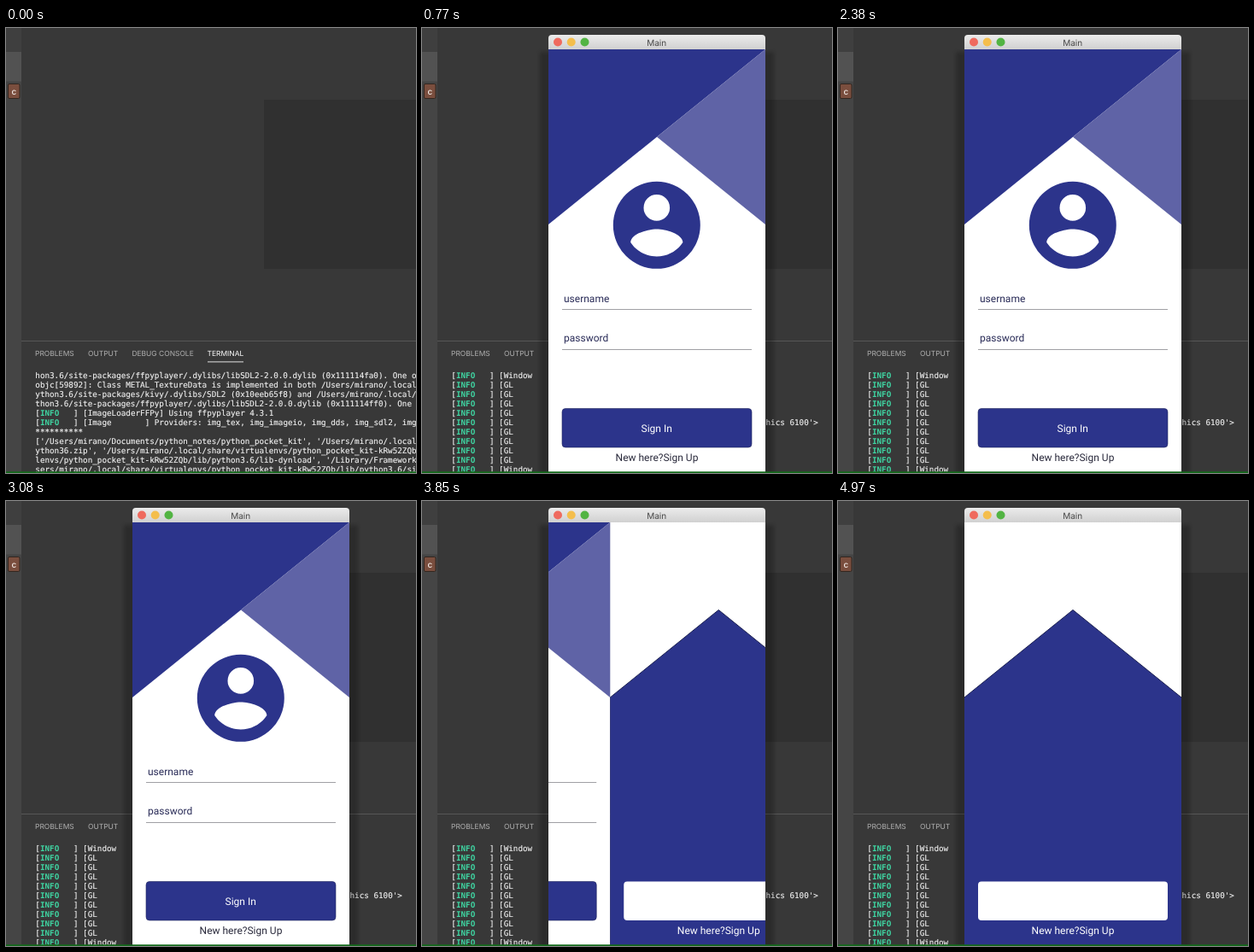
Write an HTML page that moves like this. It is 480 px wide and 521 px high and loops after 5.04 s.

```html
<!DOCTYPE html>
<html lang="en">
<head>
<meta charset="utf-8">
<title>Sign-in screen demo</title>
<style>
  html, body { margin: 0; width: 100%; height: 100%; overflow: hidden; background: #383838; }
  svg { display: block; width: 480px; height: 521px; }
  text { white-space: pre; text-rendering: geometricPrecision; }
  .term { font: 9.27px "DejaVu Sans Mono", monospace; fill: #f0f0f0; }
  .term text { stroke: #f0f0f0; stroke-width: .15px; }
  .info { font-weight: bold; fill: #3fd5a2; stroke: none; }
  .tab { font: 8.45px Inter, sans-serif; fill: #b0b0b0; }
  .app { font: 12px Roboto, sans-serif; }
  .mid { text-anchor: middle; }
</style>
</head>
<body>
<svg viewBox="0 0 480 521">
  <defs>
    <clipPath id="oldClip"><rect id="oldBox" y="398" height="123"/></clipPath>
    <clipPath id="screen"><rect x="148" y="25" width="254" height="496"/></clipPath>
    <linearGradient id="bar" x2="0" y2="1">
      <stop stop-color="#ebebeb"/><stop offset="1" stop-color="#d0d0d0"/>
    </linearGradient>
  </defs>

  <!-- editor -->
  <rect width="480" height="521" fill="#383838"/>
  <rect width="18" height="521" fill="#454545"/>
  <rect width="18" height="28" fill="#3f3f3f"/>
  <rect y="28" width="18" height="34.5" fill="#525252"/>
  <rect x="2.5" y="65.5" width="13.5" height="17" rx="1.5" fill="#7a4e3e" stroke="#33261f"/>
  <text class="mid" x="9.3" y="78" style="font:500 10px Inter,sans-serif" fill="#f4ece8">c</text>
  <rect x="302" y="84" width="198" height="198" fill="#303030"/>

  <!-- panel -->
  <path d="M18 366.5H480" stroke="#575757"/>
  <text class="tab" x="34" y="384">PROBLEMS</text>
  <text class="tab" x="96" y="384">OUTPUT</text>
  <text class="tab" x="147.4" y="384">DEBUG CONSOLE</text>
  <text class="tab" x="235.5" y="384" style="fill:#fff">TERMINAL</text>
  <path d="M236 390.9H278" stroke="#e4e4e4"/>
  <g id="newLog" class="term"></g>
  <g id="oldLog" class="term" clip-path="url(#oldClip)">
    <rect x="19" y="398" width="461" height="123" fill="#383838"/>
  </g>

  <!-- app window -->
  <g id="win">
    <rect x="138" y="28" width="274" height="510" opacity=".22" style="filter:blur(2px)"/>
    <path d="M148 25.5V12q0-4 4-4H398q4 0 4 4V25.5z" fill="url(#bar)"/>
    <circle cx="159" cy="16.5" r="5" fill="#ef6a5e"/>
    <circle cx="174.7" cy="16.5" r="5" fill="#f4be4c"/>
    <circle cx="190.5" cy="16.5" r="5" fill="#52b443"/>
    <text class="mid" x="274.7" y="20.5" style="font:10px Inter,sans-serif" fill="#484848">Main</text>
    <g clip-path="url(#screen)" class="app">
      <g id="login">
        <rect x="148" y="25" width="254" height="496" fill="#fff"/>
        <path d="M148 25H402L275 127.5L148 230z" fill="#2c348b"/>
        <path d="M402 25V230L275 127.5z" fill="#5f63a6"/>
        <path transform="translate(213.6 169.6) scale(5.1)" fill="#2c348b" d="M12 2a10 10 0 1 0 0 20a10 10 0 1 0 0-20zm0 3a3 3 0 1 1 0 6a3 3 0 1 1 0-6zm0 14.2c-2.5 0-4.71-1.28-6-3.22.03-1.99 4-3.08 6-3.08s5.97 1.09 6 3.08c-1.29 1.94-3.5 3.22-6 3.22z" fill-rule="evenodd"/>
        <g fill="#2a2c58">
          <text x="166" y="321">username</text>
          <text x="166" y="367">password</text>
        </g>
        <path d="M164 329.5H386M164 376.5H386" stroke="#a0a0a4"/>
        <rect x="164" y="445.5" width="222" height="45.5" rx="4" fill="#2c348b" stroke="#20265f" stroke-width=".6"/>
        <text class="mid" x="274.7" y="472.5" fill="#fff">Sign In</text>
        <text class="mid" x="275" y="507" fill="#2a2a3c">New here?Sign Up</text>
      </g>
      <g id="signup">
        <rect x="148" y="25" width="254" height="496" fill="#2c348b"/>
        <path d="M148 25H402V230L275 127.5L148 230z" fill="#fff"/>
        <path d="M148 230L275 127.5L402 230" fill="none" stroke="#1b2050"/>
        <rect x="164" y="445.5" width="222" height="45.5" rx="4" fill="#fff"/>
        <text class="mid" x="275" y="507" fill="#fff">New here?Sign Up</text>
      </g>
    </g>
  </g>
  <rect y="519.3" width="480" height="1.7" fill="#126a1a"/>
</svg>
<script>
const LOOP = 5040, STEP = 70, WIDTH = 254;
const LOG_AT = 700, WINDOW_AT = 770, SLIDE_AT = 3710, SLIDE_MS = 300;
const $ = id => document.getElementById(id);

const home = '/Users/mirano', app = 'python_pocket_kit', env = app + '-kRw52ZQb';
const info = '[INFO   ] ';
const oldLines = [
  'hon3.6/site-packages/ffpyplayer/.dylibs/libSDL2-2.0.0.dylib (0x111114fa0). One of',
  `objc[59892]: Class METAL_TextureData is implemented in both ${home}/.local/`,
  `ython3.6/site-packages/kivy/.dylibs/SDL2 (0x10eeb65f8) and ${home}/.local/s`,
  'thon3.6/site-packages/ffpyplayer/.dylibs/libSDL2-2.0.0.dylib (0x111114ff0). One o',
  info + '[ImageLoaderFFPy] Using ffpyplayer 4.3.1',
  info + '[Image       ] Providers: img_tex, img_imageio, img_dds, img_sdl2, img_pil',
  '*'.repeat(10),
  `['${home}/Documents/python_notes/${app}', '${home}/.local/`,
  `ython36.zip', '${home}/.local/share/virtualenvs/${env}/l`,
  `lenvs/${env}/lib/python3.6/lib-dynload', '/Library/Frameworks`,
  `sers/mirano/.local/share/virtualenvs/${env}/lib/python3.6/sit`
];
const newLines = oldLines.map((_, i) => info + (i % 10 ? '[GL' : '[Window'));
newLines[5] = newLines[5].padEnd(66) + "hics 6100'>";

function addLines(group, lines) {
  group.innerHTML += lines.map((line, i) =>
    `<text x="34.3" y="${409.5 + i * 11.04}">` +
    line.replace('[INFO', '[<tspan class="info">INFO</tspan>') + '</text>').join('');
}
addLines($('oldLog'), oldLines);
addLines($('newLog'), newLines);

const show = (id, on) => $(id).style.display = on ? '' : 'none';
const moveX = (id, x) => $(id).setAttribute('transform', `translate(${x})`);

function draw() {
  const t = Math.floor(performance.now() % LOOP / STEP) * STEP;
  const partial = t >= LOG_AT;
  $('oldBox').setAttribute('x', partial ? 120 : 19);
  $('oldBox').setAttribute('width', partial ? 310 : 461);
  show('oldLog', t < WINDOW_AT);
  show('win', t >= WINDOW_AT);

  const p = Math.min(1, Math.max(0, (t - SLIDE_AT) / SLIDE_MS));
  const shift = WIDTH * (1 - (1 - p) ** 2);
  moveX('login', -shift);
  moveX('signup', WIDTH - shift);
  requestAnimationFrame(draw);
}
draw();
</script>
</body>
</html>
```
